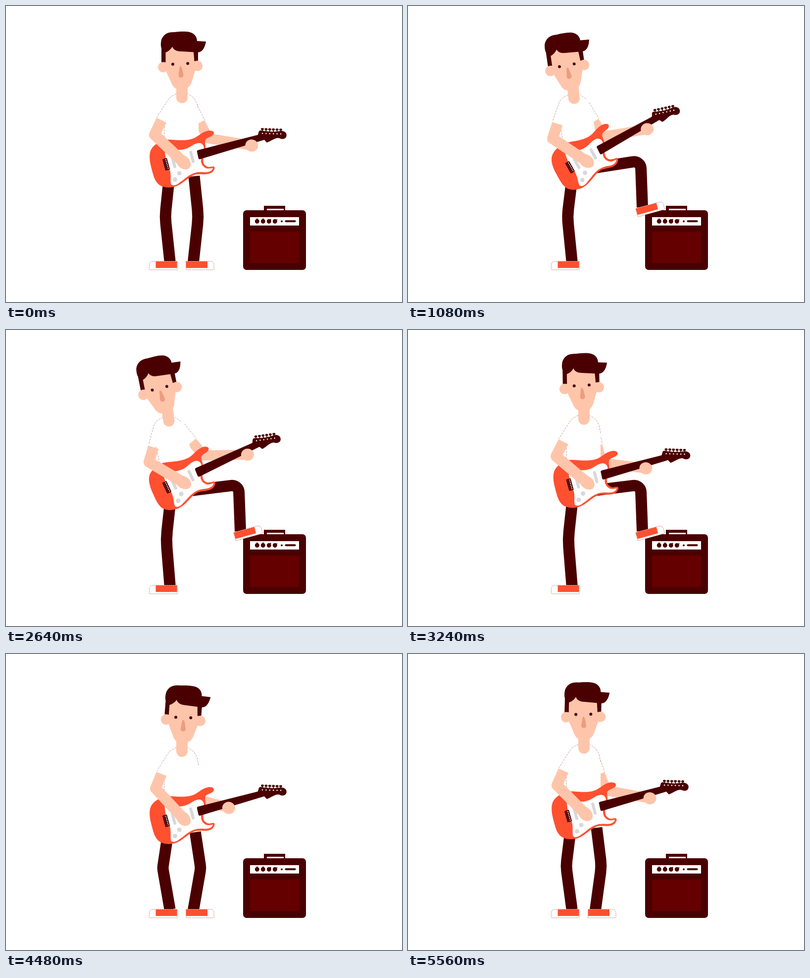
These frames come from a looping animation (800 px wide and 600 px high, 5.6 s). An HTML page with a canvas:

```html
<!DOCTYPE html>
<html lang="en">
<head>
<meta charset="utf-8">
<title>Guitar player</title>
<style>
html, body { margin: 0; width: 100%; height: 100%; overflow: hidden; background: #fff; }
canvas { display: block; }
</style>
</head>
<body>
<canvas id="stage" width="800" height="600"></canvas>
<script>
const ctx = document.getElementById('stage').getContext('2d');
const LOOP = 5600, STEP = 40, BEAT = 800;
const DARK = '#4a0000', GRILLE = '#640000', ORANGE = '#ff5030';
const SKIN = '#ffc5ab', NOSE = '#eb9d7f', GREY = '#d8d8d8', EDGE = 'rgba(120,50,35,.6)';

const mix = (a, b, k) => a + (b - a) * k;
const clamp = v => Math.max(0, Math.min(1, v));
const ease = (t, a, b) => 0.5 - 0.5 * Math.cos(Math.PI * clamp((t - a) / (b - a)));
const rad = d => d * Math.PI / 180;

// hand position along the guitar neck: [time, offset]
const SLIDE = [[0, 0], [1080, -3], [2040, -1], [2800, -1], [3240, -20], [3960, -21],
  [4480, -48], [5000, -48], [5560, -8], [5600, 0]];

function keyed(keys, t) {
  let i = 1;
  while (i < keys.length - 1 && keys[i][0] < t) i++;
  const [t0, a] = keys[i - 1], [t1, b] = keys[i];
  return mix(a, b, clamp((t - t0) / (t1 - t0)));
}

// vertical bounce of the body: quick rise, softer fall
function bounce(t) {
  const early = 0.1 * Math.max(0, 1 - Math.abs(t - 4820) / 300);
  const ph = (t / BEAT + early) % 1;
  const up = ease(ph < 0.5 ? ph + 1 : ph, 0.83, 1.16);
  const down = ease(ph, 0.16, 0.58);
  return ph > 0.16 && ph < 0.83 ? mix(-10.5, 11.5, down) : mix(11.5, -10.5, up);
}

function fill(color, d) {
  ctx.fillStyle = color;
  ctx.fill(new Path2D(d));
}
function oval(color, x, y, rx, ry, a) {
  ctx.fillStyle = color;
  ctx.beginPath();
  ctx.ellipse(x, y, rx, ry, a, 0, 7);
  ctx.fill();
}
const dot = (color, x, y, r) => oval(color, x, y, r, r, 0);
function box(color, x, y, w, h, r = 0) {
  ctx.fillStyle = color;
  ctx.beginPath();
  ctx.roundRect(x, y, w, h, r);
  ctx.fill();
}
function line(color, width, pts, cap = 'butt') {
  ctx.strokeStyle = color;
  ctx.lineWidth = width;
  ctx.lineCap = cap;
  ctx.lineJoin = 'round';
  ctx.beginPath();
  pts.forEach(p => ctx.lineTo(p[0], p[1]));
  ctx.stroke();
}
function dashed(pts) {
  ctx.setLineDash([4, 2]);
  line(EDGE, 0.8, pts);
  ctx.setLineDash([]);
}
function pivot(x, y, dx, dy, deg, draw) {
  ctx.save();
  ctx.translate(x + dx, y + dy);
  ctx.rotate(rad(deg));
  ctx.translate(-x, -y);
  draw();
  ctx.restore();
}

function amp() {
  box(DARK, 521, 405, 43, 12);
  box('#fff', 527, 411, 34, 3);
  box(DARK, 479, 414, 127, 121, 7);
  box('#fff', 493, 428, 99, 17);
  [-90, -90, -50, -40].forEach((deg, i) => {
    const x = 507.3 + 12 * i, a = rad(deg);
    dot(DARK, x, 436.5, 4.5);
    line(DARK, 2, [[x, 436.5], [x + 6 * Math.cos(a), 436.5 + 6 * Math.sin(a)]]);
  });
  dot(DARK, 557, 436.5, 2);
  line(DARK, 4, [[565.5, 436.3], [583.5, 436.3]], 'round');
  box(GRILLE, 493, 457, 99, 64);
}

function leg(hip, knee, ankle, r) {
  ctx.strokeStyle = DARK;
  ctx.lineWidth = 23;
  ctx.lineCap = 'butt';
  ctx.lineJoin = 'round';
  ctx.beginPath();
  ctx.moveTo(...hip);
  ctx.arcTo(...knee, ...ankle, r);
  ctx.lineTo(...ankle);
  ctx.stroke();
}

// ankle at the origin, toe pointing right
function shoe(x, y, deg, flip) {
  ctx.save();
  ctx.translate(x, y);
  ctx.scale(flip, 1);
  ctx.rotate(rad(deg));
  box('#fff', -15.5, 0, 56.5, 18, [0, 7, 1, 0]);
  ctx.setLineDash([3, 1]);
  ctx.strokeStyle = EDGE;
  ctx.lineWidth = 0.8;
  ctx.beginPath();
  ctx.roundRect(-15.5, 0.5, 56.5, 17.3, [0, 7, 1, 0]);
  ctx.stroke();
  ctx.setLineDash([]);
  box(ORANGE, -15, 0.8, 43, 13.2);
  ctx.restore();
}

function head() {
  fill(DARK, `M314 114 V86 C312 79 313 73 314 68 C319 56 328 52.5 340 53 C350 52 362 51 371 53
    C380 55 386 62 386 71 L404 72 C402 83 398 93 388 94 L388 112 H378 L376 98 L326 98 L323 114 Z`);
  dot(SKIN, 317.7, 124, 10.6);
  dot(SKIN, 386.6, 121.5, 10.6);
  fill(SKIN, `M322.5 94 C328 92 333 88 336 82.5 C339 90 346 92 354 92 L379 93.5 L380.5 112
    L382 132 L374.5 156 C369 168 362 168 355 168 C346 168 341 169 335.5 159 L324 134 L322.5 112 Z`);
  dot(DARK, 337, 118, 3);
  dot(DARK, 367.2, 116.6, 3);
  fill(NOSE, 'M352 122 C354 122 355 124 356 128 L358.5 140 C358.5 147 348.5 147 348.5 140 L350 128 C350.5 124 351 122 352 122 Z');
}

function guitar() {
  fill(ORANGE, `M420 260 C422 256 417 252 408 253.5 C394 256 388 267 374 270.5 C356 275 336 270 324 271
    C312 274 301 280 295 288 C289 296 289 310 293 326 C297 342 299 350 304 357 C310 367 326 370 339 367
    C356 363 366 348 382 342 C394 340 406 344.5 416 338 C422 333 422.5 328 420 326 C414 325 411 329 405.5 325.5
    C397 321 398 314 399 306 L403 292 C404.5 284 401 280 403 272 C407 266 418 266 420 260 Z`);
  fill('#fff', `M388 278.5 C396 277 401 284 400 291 L395.5 305 C392.5 314 393.5 323 402.5 328.5
    C408 332 414 329 418 329 C416 336.5 407 338 400 337.5 C374 334.5 364 350 350 358.5
    C343 365 334 365 333 361 C331 352 335 341 329 328 C324 316 321 306 320.5 283
    C328 290 338 292 350 292 C372 291 374 281 388 278.5 Z`);
  line(GREY, 6, [[373.3, 297], [378, 315.5]], 'round');
  line(GREY, 6, [[354, 302], [359, 320]], 'round');
  line(GREY, 6, [[336, 308], [341, 326]], 'round');
  dot(GREY, 350, 339.3, 4.5);
  dot(GREY, 341.3, 352, 4.5);
  ctx.save();
  ctx.translate(323.5, 321);
  ctx.rotate(rad(-15));
  box(DARK, -4.7, -12, 9.4, 24, 1);
  for (let i = 0; i < 6; i++) {
    dot('#fff', 1.8, -9 + 3.6 * i, 1.1);
    dot('#b99', -2, -9 + 3.6 * i, 0.6);
  }
  ctx.restore();
  fill(DARK, `M388.5 292.4 L509 262.5 C511 259 510 253 515 253.5 C528 256 542 257 552 255
    C560 253 567 257 567 263 C567 271 559 273 552 269 C543 268 537 275 527 278
    L522 272.5 L392 311 C390 311.5 389 310 388.5 308 L386 296 C385.5 294 386.5 293 388.5 292.4 Z`);
  for (let i = 0; i < 6; i++) {
    const x = 518.3 + 7.4 * i, y = 250.7 + 0.25 * i;
    oval(DARK, x, y, 3, 2.2, 0);
    line(DARK, 1.8, [[x, y], [x, y + 7]]);
    dot('#fff', x, y + 8.7, 1.3);
  }
}

function draw(t) {
  const y = bounce(t);
  const lean = ease(t, 640, 1460) - ease(t, 2420, 3060);
  const tilt = ease(t, 580, 1240) - ease(t, 2360, 3000);
  const step = ease(t, 620, 960) - ease(t, 3380, 3720);
  const gx = 3.5 * step - 6 * lean, gy = 1.5 * y - 0.3, ga = -0.3 - 16.2 * tilt;
  const onGuitar = (px, py) => {
    const c = Math.cos(rad(ga)), s = Math.sin(rad(ga)), u = px - 357, v = py - 310.5;
    return [357 + gx + u * c - v * s, 310.5 + gy + u * s + v * c];
  };
  const body = (px, py) => [px - 36 * lean * clamp((310 - py) / 110), py + y + 5 * lean];

  ctx.fillStyle = '#fff';
  ctx.fillRect(0, 0, 800, 600);
  amp();

  // legs: the knee gets sharper as the body sinks
  const kx = 321.5 - 0.42 * y, ky = 427 + 0.6 * y, hy = 345 + 1.4 * y, soft = 130 - 9 * y;
  leg([330 - 0.2 * y + 2 * step, hy], [kx, ky], [331.2, 518], soft);
  shoe(330.5, 517, 0, -1);
  const lift = 22 * Math.sin(Math.PI * step);
  const foot = [mix(379, 474.5, step), mix(517, 406, step) - lift];
  leg([mix(380 + 0.2 * y, 365, step), mix(hy, 331 + 0.9 * y, step)],
    [mix(710 - kx, 470, step), mix(ky, 313.5, step) - lift * 0.6],
    [mix(378.5, 473.5, step), foot[1] + 2], soft * (1 - step) ** 2 + 14);
  shoe(foot[0], foot[1], -15.5 * step, 1);

  // fretting arm, solved from shoulder and hand
  const k = keyed(SLIDE, t);
  const hand = onGuitar(497 + 0.97 * k, 284 - 0.24 * k);
  const sh = [371 - 33 * lean, 195 + y + lean];
  const dx = hand[0] - sh[0], dy = hand[1] - sh[1];
  const d = Math.min(171, Math.hypot(dx, dy));
  const a = (82 * 82 - 90 * 90 + d * d) / (2 * d);
  const h = Math.sqrt(Math.max(0, 82 * 82 - a * a));
  const elbow = [sh[0] + (dx * a - dy * h) / d, sh[1] + (dy * a + dx * h) / d];
  const along = n => [mix(sh[0], elbow[0], n), mix(sh[1], elbow[1], n)];
  line(SKIN, 20.5, [along(0.56), elbow, hand]);
  const nx = (elbow[1] - sh[1]) / 82 * 11, ny = -(elbow[0] - sh[0]) / 82 * 11;
  dashed([0.1, 0.56].map(n => [along(n)[0] + nx, along(n)[1] + ny]));

  // torso
  const outline = [[344, 178], [333, 184], [326, 192], [320, 226], [320, 300],
    [389, 300], [389, 214], [386, 198], [380, 187], [368, 178]].map(p => body(...p));
  ctx.fillStyle = '#fff';
  ctx.beginPath();
  outline.forEach(p => ctx.lineTo(...p));
  ctx.fill();
  dashed(outline.slice(6));
  line('#fff', 20, [sh, along(0.56)]);
  dashed([body(320, 238), body(320, 285)]);
  const hem = [314 - 22 * lean, 231.5 + y + 15 * lean];
  dashed([...outline.slice(0, 3), [hem[0] - 9.5, hem[1] - 5.5]]);

  // neck and head
  const cx = 355.5 - 36 * lean, cy = 185.5 + y + 5 * lean, na = rad(11 * lean);
  line(SKIN, 23, [[cx, cy], [cx - 30 * Math.sin(na), cy - 30 * Math.cos(na)]], 'round');
  const nod = 0.24 * y + 0.012 * y * y - 14 * lean;
  pivot(355.5, 197, -36 * lean, y + 5 * lean, nod, head);

  pivot(357, 310.5, gx, gy, ga, guitar);

  // hands and strumming arm
  const reach = Math.atan2(hand[1] - elbow[1], hand[0] - elbow[0]);
  oval(SKIN, hand[0] - 0.5, hand[1], 13, 12.3, reach);
  const ex = 300 + Math.min(0.45 * y * (1 - 0.8 * step), 0.18 * y) - 14 * lean;
  const ey = 261 + y + 16 * lean;
  const pick = onGuitar(361, 319.5);
  const aim = Math.atan2(pick[1] - ey, pick[0] - ex);
  line(SKIN, 22, [hem, [ex, ey], [pick[0] - 10 * Math.cos(aim), pick[1] - 10 * Math.sin(aim)]]);
  oval(SKIN, pick[0] - 4 * Math.cos(aim), pick[1] - 4 * Math.sin(aim), 17, 12.5, aim);
}

const start = performance.now();
function frame() {
  const t = (performance.now() - start) % LOOP;
  draw(Math.floor(t / STEP) * STEP);
  requestAnimationFrame(frame);
}
frame();
</script>
</body>
</html>
```
